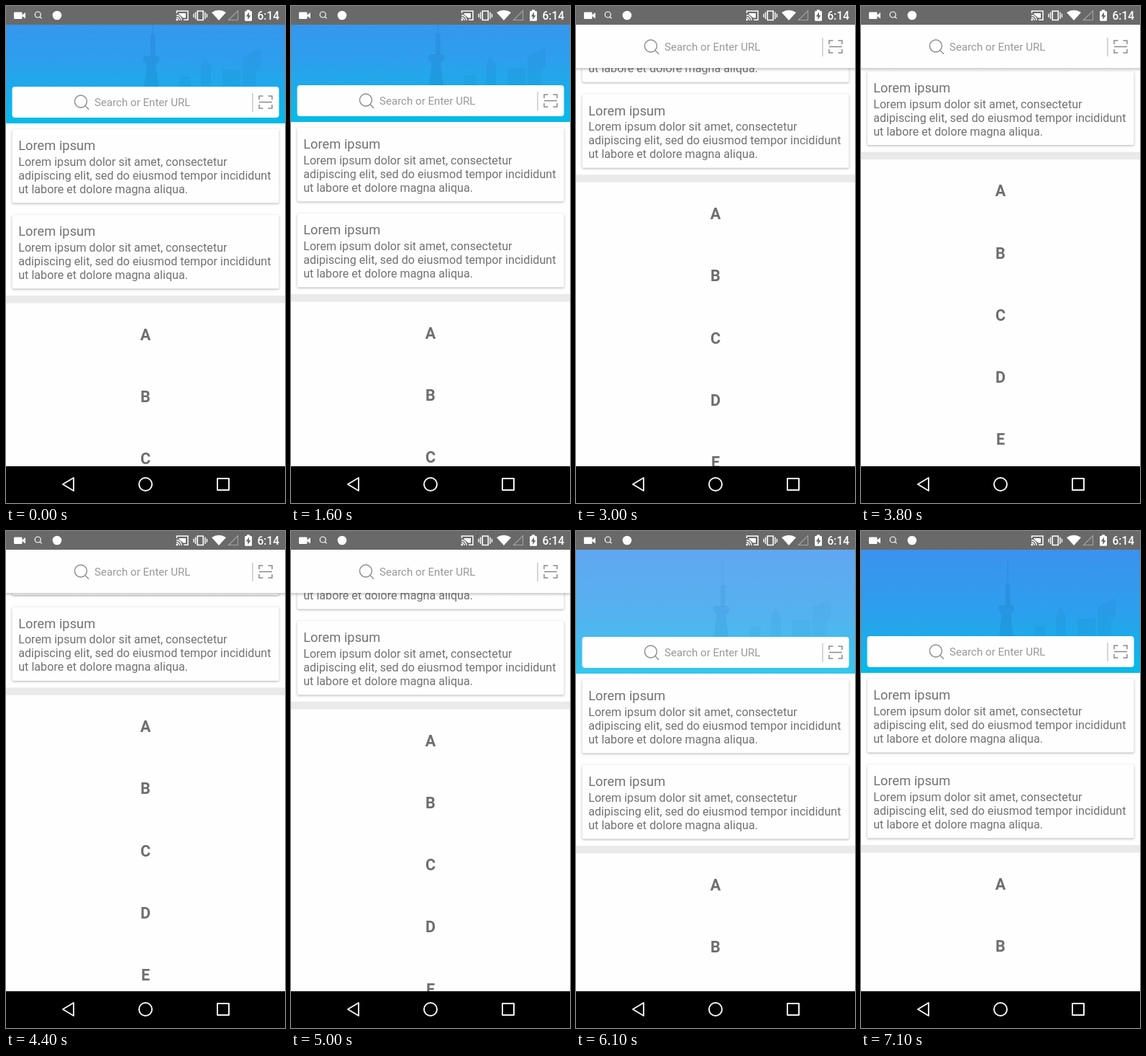
These frames come from a looping animation (388 by 690 pixels, 7200 ms). An HTML page with a canvas:

```html
<!DOCTYPE html>
<html lang="en">
<head>
<meta charset="utf-8">
<title>Collapsing search header</title>
<style>
  html, body { margin: 0; width: 100%; height: 100%; overflow: hidden; background: #fefefe; }
  canvas { display: block; width: 388px; height: 690px; }
</style>
</head>
<body>
<canvas id="stage"></canvas>
<script>
const W = 388, H = 690, LOOP = 7200, STEP = 100;
const TOP = 26, NAV = 639, FOLD = 77, BASE = 163;
const FONT = 'Roboto, sans-serif';
const TEXT = '#727274', HINT = '#999', ICON = '#8a8a8a', WHITE = '#fff', PAPER = '#fefefe';

const canvas = document.getElementById('stage');
const ctx = canvas.getContext('2d');
const dpr = window.devicePixelRatio || 1;
canvas.width = W * dpr;
canvas.height = H * dpr;

const clamp = v => Math.max(0, Math.min(1, v));
const progress = (t, from, to) => clamp((t - from) / (to - from));
const smooth = p => p * p * (3 - 2 * p);

// Slow drag, fling that decays, drag back, fling to the top, last nudge
function scrollAt(t) {
  return 40 * progress(t, 1500, 2300) ** 1.45
    + 159.5 * (1 - (1 - progress(t, 2300, 3900)) ** 2.8)
    - 34.5 * smooth(progress(t, 3900, 5000))
    - 200 * smooth(progress(t, 5000, 5700))
    + progress(t, 6400, 7100);
}

// The sky fades out with the scroll but comes back on its own clock
function skyAt(t, scroll) {
  return t < 5000 ? clamp((FOLD - scroll) / 62) : progress(t, 5400, 6200) ** 1.6;
}

function rect(x, y, w, h, color) {
  ctx.fillStyle = color;
  ctx.fillRect(x, y, w, h);
}

function roundRect(x, y, w, h, r, color) {
  ctx.beginPath();
  ctx.roundRect(x, y, w, h, r);
  ctx.fillStyle = color;
  ctx.fill();
}

function trace(points) {
  ctx.beginPath();
  points.forEach(([x, y]) => ctx.lineTo(x, y));
}

function poly(points, color) {
  trace(points);
  ctx.fillStyle = color;
  ctx.fill();
}

function line(points, color, width, closed) {
  trace(points);
  if (closed) ctx.closePath();
  ctx.strokeStyle = color;
  ctx.lineWidth = width;
  ctx.stroke();
}

function arc(x, y, r, color, width, from = 0, to = Math.PI * 2) {
  ctx.beginPath();
  ctx.arc(x, y, r, from, to);
  ctx.strokeStyle = color;
  ctx.lineWidth = width;
  ctx.stroke();
}

function dot(x, y, r, color) {
  ctx.beginPath();
  ctx.arc(x, y, r, 0, Math.PI * 2);
  ctx.fillStyle = color;
  ctx.fill();
}

function magnifier(x, y, r, color, width) {
  arc(x, y, r, color, width);
  const a = r * 0.72, b = r * 1.32;
  line([[x + a, y + a], [x + b, y + b]], color, width);
}

function label(text, x, y, size, color, weight = 400, align = 'left') {
  ctx.font = `${weight} ${size}px ${FONT}`;
  ctx.textAlign = align;
  ctx.fillStyle = color;
  ctx.fillText(text, x, y);
}

function card(y) {
  ctx.save();
  ctx.shadowColor = 'rgba(0,0,0,0.3)';
  ctx.shadowBlur = 3 * dpr;
  ctx.shadowOffsetY = dpr;
  roundRect(8.6, y, 371, 102.5, 2, PAPER);
  ctx.restore();
  label('Lorem ipsum', 17.2, y + 29.3, 18.33, TEXT);
  ['Lorem ipsum dolor sit amet, consectetur',
   'adipiscing elit, sed do eiusmod tempor incididunt',
   'ut labore et dolore magna aliqua.'
  ].forEach((s, i) => label(s, 17.2, y + 51 + i * 19, 16.17, TEXT));
}

function content(scroll) {
  ctx.save();
  ctx.translate(0, -scroll);
  card(171);
  card(290);
  rect(0, 402, W, 10.5, '#ebeaeb');
  [...'ABCDEF'].forEach((c, i) =>
    label(c, 194, 463.8 + i * 86.2, 21.56, '#6d6d70', 700, 'center'));
  ctx.restore();
}

function skyline() {
  const near = 'rgba(20,112,190,0.22)', far = 'rgba(20,112,190,0.11)';
  rect(203.5, 6, 1.5, 34, near);
  rect(201, 40, 6.5, 30, near);
  poly([[193, 69], [211, 69], [214, 74], [209, 81], [195, 81], [190, 74]], near);
  poly([[196, 81], [208, 81], [213, 120], [191, 120]], near);
  rect(241, 98, 16, 22, far);
  poly([[271, 120], [271, 84], [277, 72], [285, 84], [285, 120]], far);
  rect(301, 88, 25, 32, far);
  poly([[329, 120], [329, 71], [354, 59], [354, 86], [348, 90], [348, 120]], far);
}

function searchBar() {
  roundRect(8.6, 112, 371, 43, 4, PAPER);
  magnifier(104, 132.5, 8.5, ICON, 1.4);
  label('Search or Enter URL', 123, 139, 15.09, HINT);
  rect(342.4, 121, 1.2, 26, '#bcbcbc');
  const x = 361, y = 133.5;
  for (const sx of [-1, 1]) {
    for (const sy of [-1, 1]) {
      line([[x + sx * 9, y + sy * 3.5], [x + sx * 9, y + sy * 8.5],
            [x + sx * 3.5, y + sy * 8.5]], ICON, 1.5);
    }
  }
  line([[x - 9, y], [x + 9, y]], ICON, 1.5);
}

function header(scroll, sky) {
  const bottom = BASE - Math.min(scroll, FOLD);
  const height = bottom - TOP;
  const folded = clamp((scroll - FOLD + 6) / 6);

  const shade = ctx.createLinearGradient(0, bottom, 0, bottom + 5);
  shade.addColorStop(0, `rgba(0,0,0,${0.2 * folded})`);
  shade.addColorStop(1, 'rgba(0,0,0,0)');
  rect(0, bottom, W, 5, shade);

  ctx.save();
  ctx.beginPath();
  ctx.rect(0, TOP, W, height);
  ctx.clip();
  rect(0, TOP, W, height, PAPER);

  const blue = ctx.createLinearGradient(0, bottom - 171, 0, bottom);
  blue.addColorStop(0, '#3b92ee');
  blue.addColorStop(0.5, '#2d9fec');
  blue.addColorStop(1, '#05bbe9');
  ctx.globalAlpha = sky;
  rect(0, TOP, W, height, blue);

  // skyline and search bar stay pinned to the lower edge
  ctx.translate(0, bottom - BASE);
  ctx.globalAlpha = clamp((sky - 0.55) / 0.45);
  skyline();
  ctx.globalAlpha = 1;
  searchBar();
  ctx.restore();
}

function castIcon() {
  line([[237.5, 10], [237.5, 7], [253, 7], [253, 19.3], [247, 19.3]], WHITE, 1.5);
  poly([[240.5, 10], [250, 10], [250, 16.5], [246.5, 16.5], [240.5, 11.5]], WHITE);
  dot(237.8, 19, 1.4, WHITE);
  for (const r of [4.2, 7.2]) arc(237, 20, r, WHITE, 1.4, -Math.PI / 2, 0);
}

function vibrateIcon() {
  const x = 270.25;
  line([[x - 4, 7], [x + 4, 7], [x + 4, 19.5], [x - 4, 19.5]], WHITE, 1.6, true);
  for (const side of [-1, 1]) {
    rect(x + side * 6.7 - 0.7, 8.5, 1.4, 9.5, WHITE);
    rect(x + side * 9.2 - 0.7, 10.8, 1.4, 5, WHITE);
  }
}

function wifiIcon() {
  ctx.beginPath();
  ctx.moveTo(296, 20);
  ctx.lineTo(286, 9);
  ctx.quadraticCurveTo(296, 2.5, 306, 9);
  ctx.fillStyle = WHITE;
  ctx.fill();
}

function batteryIcon(back) {
  roundRect(332, 7, 10, 13.8, 1.2, WHITE);
  rect(334.8, 5.3, 4.4, 2, WHITE);
  poly([[338, 8.5], [333.8, 14.6], [336.3, 14.6], [336.3, 19], [340.4, 12.9], [338, 12.9]], back);
}

function statusBar() {
  const back = '#696969';
  rect(0, 0, W, TOP, back);
  roundRect(11, 8.5, 11.5, 9.5, 1.2, WHITE);
  poly([[21.5, 13.2], [27, 9], [27, 17.5]], WHITE);
  magnifier(44.3, 12, 4, WHITE, 1.2);
  dot(71, 13, 6.3, WHITE);
  castIcon();
  vibrateIcon();
  wifiIcon();
  line([[309.5, 19.5], [322.5, 6.5], [322.5, 19.5]], '#a5a5a5', 1.1, true);
  batteryIcon(back);
  label('6:14', 349.5, 19, 15.6, WHITE, 500);
}

function navBar() {
  const ink = '#f4f4f4', y = 664;
  rect(0, NAV, W, H - NAV, '#000');
  ctx.lineJoin = 'round';
  line([[79, y], [94, y - 9], [94, y + 9]], ink, 2, true);
  arc(194, y, 9, ink, 2);
  line([[294, y - 8], [310, y - 8], [310, y + 8], [294, y + 8]], ink, 2, true);
  ctx.lineJoin = 'miter';
}

function draw(t) {
  const scroll = scrollAt(t);
  ctx.setTransform(dpr, 0, 0, dpr, 0, 0);
  rect(0, 0, W, H, PAPER);
  content(scroll);
  header(scroll, skyAt(t, scroll));
  statusBar();
  navBar();
}

const start = performance.now();
function tick() {
  const t = (performance.now() - start) % LOOP;
  draw(Math.floor(t / STEP) * STEP);
  requestAnimationFrame(tick);
}
tick();
</script>
</body>
</html>
```
